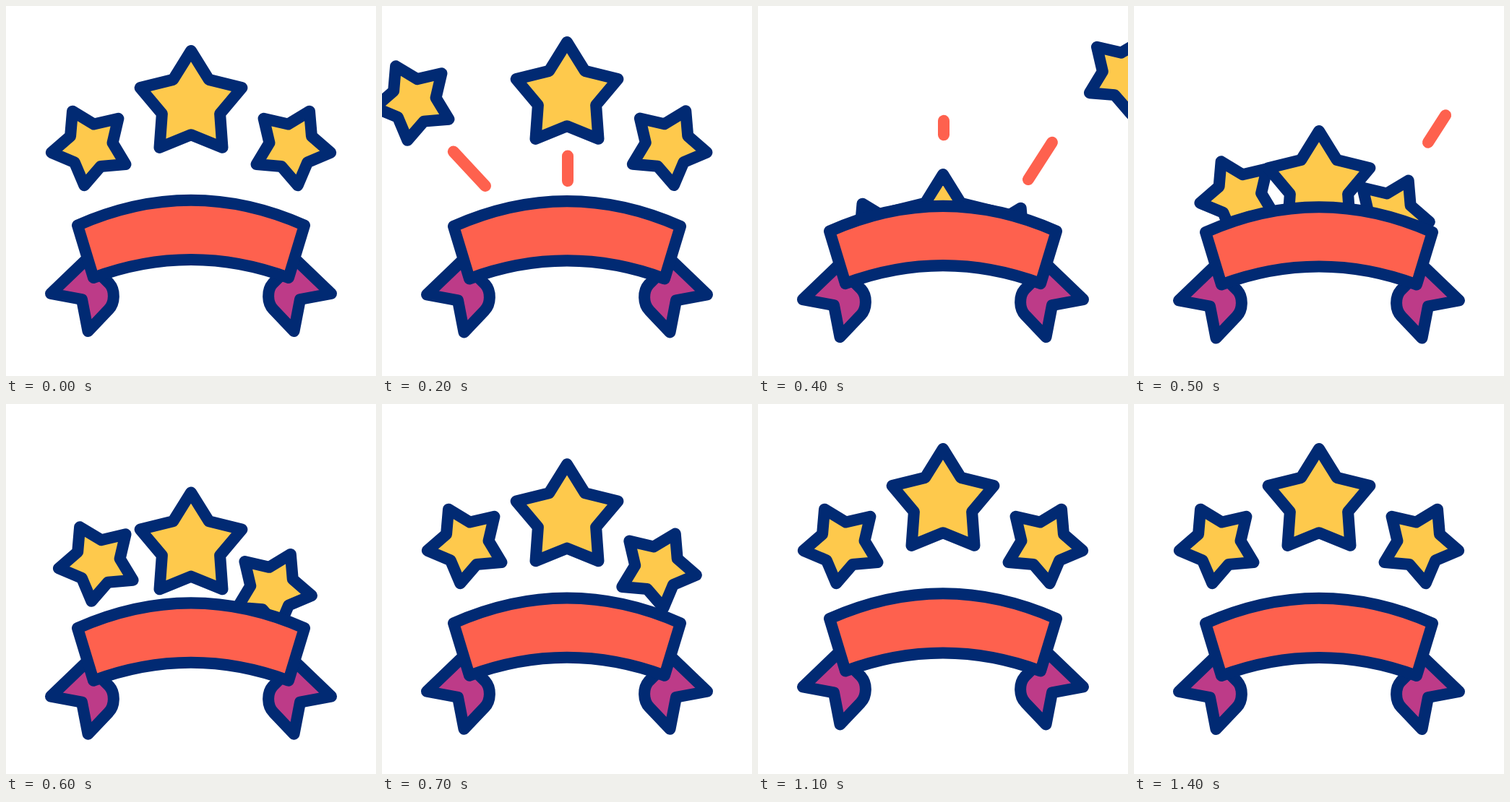
Recreate the animation shown at these times as an HTML page. Size 512 by 512 pixels, loop 1.5 s.

```html
<!DOCTYPE html>
<html lang="en">
<head>
<meta charset="utf-8">
<title>Ribbon and stars</title>
<style>
  html, body { margin: 0; width: 100%; height: 100%; overflow: hidden; background: #fff; }
  svg { display: block; width: 100vw; height: 100vh; }
  .ink { stroke: #012a73; stroke-width: 16; stroke-linejoin: round; }
  .star { fill: #fec94c; }
  .tail { fill: #bd3b88; }
  .band { fill: #fe614e; }
  .trail { stroke: #fe614e; stroke-width: 16; stroke-linecap: round; }
</style>
</head>
<body>
<svg viewBox="0 0 512 512">
  <defs>
    <path id="tail" class="ink tail" d="M62 398L105 406L113.500 450L142 420C151 411 151 393 143 384L134 375L112 350Z"/>
    <clipPath id="above"><rect x="-100" y="-100" width="712" height="435"/></clipPath>
  </defs>
  <g id="trails"></g>
  <g id="flying"></g>
  <g id="rising" clip-path="url(#above)"></g>
  <g id="ribbon">
    <use href="#tail"/>
    <use href="#tail" transform="matrix(-1 0 0 1 512 0)"/>
    <path class="ink band" d="M99 303.500Q256 234 413 303.500L391 376Q256 326 121 376Z"/>
  </g>
</svg>
<script>
const STEP = 100, STEPS = 15, RISE = 4;
const $ = id => document.getElementById(id);
const clamp = v => Math.min(1, Math.max(0, v));

function add(parent, tag, attrs) {
  const el = document.createElementNS('http://www.w3.org/2000/svg', tag);
  for (const k in attrs) el.setAttribute(k, attrs[k]);
  return $(parent).appendChild(el);
}

// Regular five-pointed star, first tip at the given angle in degrees
function starPoints(cx, cy, size, angle) {
  return Array.from({ length: 10 }, (_, i) => {
    const r = i % 2 ? size * .57 : size, a = (angle + i * 36) * Math.PI / 180;
    return [cx + r * Math.cos(a), cy + r * Math.sin(a)];
  }).join(' ');
}

// Each star flies off along dir, then a new one rises from depth until step home.
// Its trail runs along ray from base.
const stars = [
  { at: [116.8, 194.3], size: 54.6, angle: -117, dir: [-.76, -.65], start: 0,
    depth: 128, home: 7, slant: .41,
    base: [143, 249], ray: [-.68, -.73], len: 130, from: 1, span: 3 },
  { at: [256, 136], size: 74, angle: -90, dir: [0, -1], start: 1,
    depth: 171, home: 8, slant: 0,
    base: [257, 242], ray: [0, -1], len: 90, from: 1, span: 4 },
  { at: [395.2, 194.3], size: 54.6, angle: -63, dir: [.75, -.66], start: 1.68,
    depth: 134, home: 9, slant: -.42,
    base: [374, 240], ray: [.54, -.84], len: 122, from: 3, span: 3 }
];

for (const s of stars) {
  const shape = { class: 'ink star', points: starPoints(...s.at, s.size, s.angle) };
  s.fly = add('flying', 'polygon', shape);
  s.rise = add('rising', 'polygon', shape);
  s.trail = add('trails', 'path', { class: 'trail' });
}

// Ribbon height: sine easing between a few turning points [step, offset]
const turns = [[1, 0], [5, 9.5], [9, -10], [14, 0]];

function sway(n) {
  const i = turns.findIndex(t => t[0] > n);
  if (i < 1) return 0;
  const [a, y0] = turns[i - 1], [b, y1] = turns[i];
  return y0 + (y1 - y0) * (1 - Math.cos(Math.PI * (n - a) / (b - a))) / 2;
}

const move = (el, x, y) => el.setAttribute('transform', `translate(${x} ${y})`);

function drawTrail(s, n) {
  const k = n - s.from;
  const point = steps => {
    const d = s.len * Math.sin(clamp(steps / s.span) * Math.PI / 2);
    return s.base.map((v, i) => v + d * s.ray[i]);
  };
  const shown = k > 0 && k < s.span;
  s.trail.setAttribute('d', shown ? `M${point(k - 1)}L${point(k)}` : '');
}

function draw(n) {
  move($('ribbon'), 0, sway(n));
  $('rising').style.display = n < RISE ? 'none' : '';
  for (const s of stars) {
    const out = 12 * Math.max(0, n - s.start) ** 3;
    const up = s.depth * clamp((s.home - n) / (s.home - RISE)) ** 1.5;
    move(s.fly, out * s.dir[0], out * s.dir[1]);
    s.fly.style.display = n < RISE + 3 ? '' : 'none';
    move(s.rise, up * s.slant, up);
    drawTrail(s, n);
  }
}

function tick() {
  draw(Math.floor(performance.now() / STEP) % STEPS);
  requestAnimationFrame(tick);
}
tick();
</script>
</body>
</html>
```
